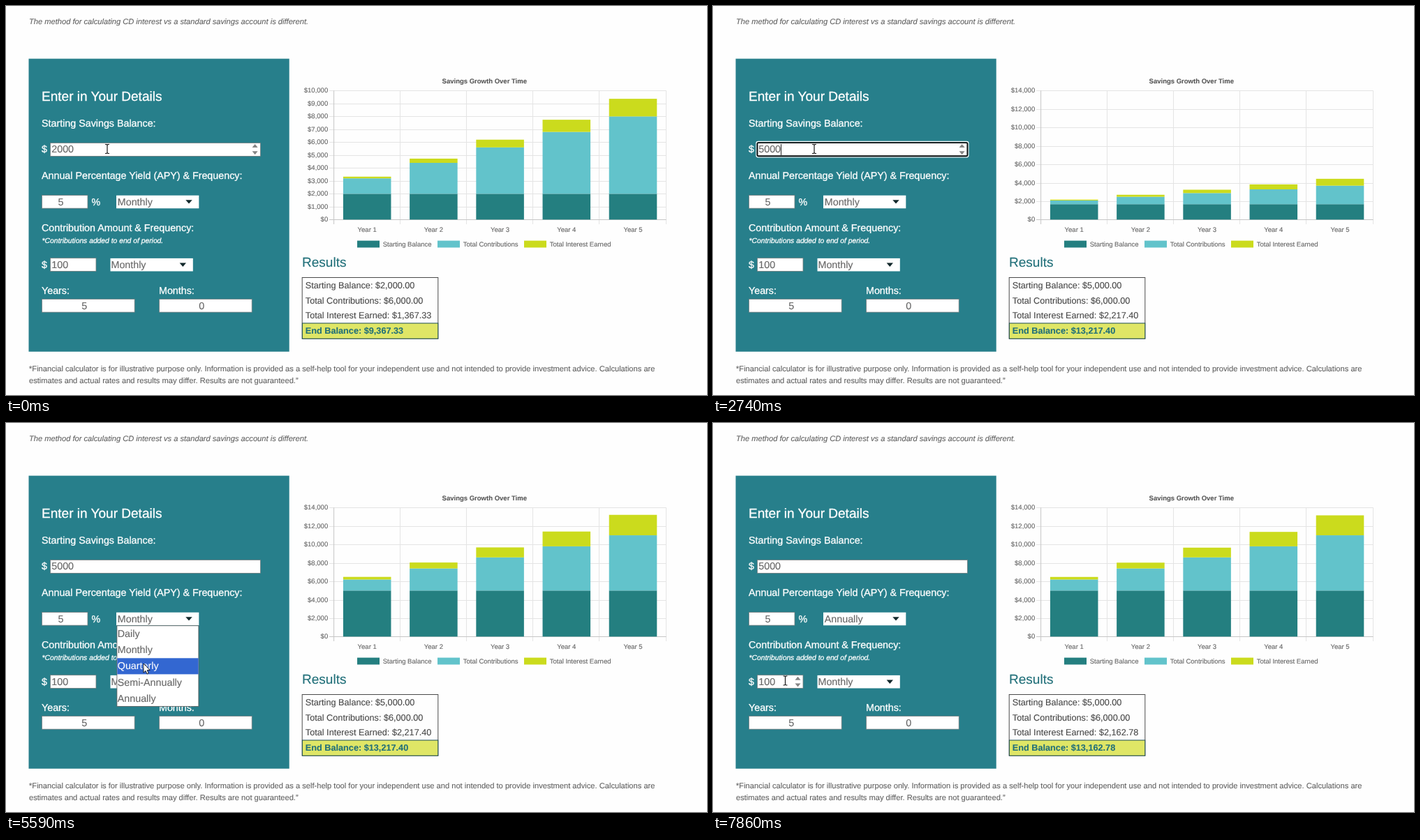
Recreate the animation shown at these times as an HTML page. Size 1004x558 px, loop 8000 ms.

```html
<!DOCTYPE html>
<html lang="en">
<head>
<meta charset="utf-8">
<title>Savings calculator</title>
<style>
html, body { margin: 0; width: 100%; height: 100%; overflow: hidden; background: #fefefe; }
svg { display: block; width: 100vw; height: 100vh; }
text {
  font: 14.29px "Liberation Sans", Arial, sans-serif; white-space: pre; text-rendering: geometricPrecision;
  color: #666; fill: currentColor; stroke: currentColor; stroke-width: .12;
}
.label text { color: #fff; stroke-width: .3; }
.label .head { font-size: 19.05px; }
.label .hint { font-size: 10.32px; font-style: italic; }
.note text { font-size: 11.13px; color: #636363; }
.note .intro { font-style: italic; }
.chart text { font-size: 9.53px; }
.chart .title { font-weight: bold; color: #585858; }
.mid { text-anchor: middle; }
.end { text-anchor: end; }
.field { fill: #fff; stroke: #6f7a7c; stroke-width: .8; }
.select { fill: #fff; }
.tri { fill: #12282b; }
.spin { fill: #858585; }
.rows text { font-size: 12.7px; color: #484848; }
.rows .total { font-weight: bold; color: #22707a; }
.results { font-size: 19.05px; color: #22707a; }
</style>
</head>
<body>
<svg id="stage" viewBox="0 0 1004 558">
  <g class="note">
    <text class="intro" x="33" y="26">The method for calculating CD interest vs a standard savings account is different.</text>
    <text x="33" y="523.7">*Financial calculator is for illustrative purpose only. Information is provided as a self-help tool for your independent use and not intended to provide investment advice. Calculations are</text>
    <text x="33" y="540.5">estimates and actual rates and results may differ. Results are not guaranteed.”</text>
  </g>

  <rect x="32.5" y="75.6" width="373.2" height="420.2" fill="#277f8b"/>
  <g class="label">
    <text class="head" x="51" y="136.3">Enter in Your Details</text>
    <text x="51" y="173">Starting Savings Balance:</text>
    <text x="51" y="210.3">$</text>
    <text x="51" y="248">Annual Percentage Yield (APY) &amp; Frequency:</text>
    <text x="122.5" y="285.5">%</text>
    <text x="51" y="322.8">Contribution Amount &amp; Frequency:</text>
    <text class="hint" x="51.5" y="340.3">*Contributions added to end of period.</text>
    <text x="51" y="375.6">$</text>
    <text x="51" y="412.8">Years:</text>
    <text x="219" y="412.8">Months:</text>
  </g>
  <rect class="field" x="63.4" y="196.4" width="301" height="19"/>
  <rect class="field" x="51.4" y="271.4" width="65.6" height="18.8"/>
  <rect class="field" x="63.4" y="361.7" width="65.6" height="18.8"/>
  <rect class="field" x="51.4" y="420.4" width="132.8" height="18.8"/>
  <rect class="field" x="219.4" y="420.4" width="132.8" height="18.8"/>
  <rect class="select" x="158" y="271.7" width="118.3" height="18.6"/>
  <rect class="select" x="149.5" y="361.9" width="118.3" height="18.6"/>
  <path class="tri" d="M257.3 278.2h9.4l-4.7 5.4zM248.6 368.6h9.4l-4.7 5.4z"/>
  <text class="mid" x="78.5" y="285.5">5</text>
  <text x="65.3" y="375.8">100</text>
  <text x="150.5" y="375.8">Monthly</text>
  <text class="mid" x="112.2" y="434.5">5</text>
  <text class="mid" x="280.2" y="434.5">0</text>
  <text id="frequency" x="159.8" y="285.5"></text>

  <g id="ring" fill="none">
    <rect x="62" y="194.5" width="303.9" height="22.3" rx="2.5" stroke="#fff" stroke-width="1.3"/>
    <rect x="63.5" y="196.1" width="300.9" height="19.2" rx="1.5" stroke="#0b0f10" stroke-width="1.9"/>
  </g>
  <rect id="selection" x="65" y="198" width="32.4" height="16" fill="#4163c9"/>
  <text id="balance" x="65.3" y="210.3"></text>
  <rect id="caret" y="198" width="1" height="16" fill="#222"/>
  <path id="spinBalance" class="spin" d="M352.6 203h8l-4-5zM352.6 208.3h8l-4 5z"/>
  <path id="spinRate" class="spin" d="M105.5 278.7h8l-4-5zM105.5 283.6h8l-4 5z"/>
  <path id="spinAmount" class="spin" d="M117.5 368.7h8l-4-5zM117.5 373.6h8l-4 5z"/>

  <g class="chart">
    <text class="title mid" x="685.3" y="110.7">Savings Growth Over Time</text>
    <path id="grid" fill="none" stroke="#e4e4e4"/>
    <path d="M463 306.5H945.6M469.6 121.3V313" fill="none" stroke="#c6c6c6"/>
    <g id="ticks"></g>
    <g id="bars"></g>
    <g id="legend"></g>
  </g>

  <text class="results" x="424" y="374">Results</text>
  <rect x="424.2" y="389.5" width="194.6" height="87.7" fill="#fefefe" stroke="#4a4a4a"/>
  <rect x="424.4" y="455" width="194.4" height="22.2" fill="#dfe666" stroke="#1c4f55"/>
  <g class="rows" id="rows">
    <text x="428.8" y="405"></text>
    <text x="428.8" y="426.5"></text>
    <text x="428.8" y="448"></text>
    <text class="total" x="428.8" y="470.2"></text>
  </g>

  <g id="menu">
    <rect x="158.9" y="290.8" width="117" height="115.8" fill="#fff" stroke="#555" stroke-width=".8"/>
    <rect id="hover" x="159.3" width="116.3" height="23.1" fill="#3367d1"/>
    <g id="options"></g>
  </g>
  <path id="arrow" d="M0 0V13.2L3 10.4 5 15 7.2 14 5.2 9.6H9.2Z" fill="#fff" stroke="#111" stroke-width=".9"/>
  <path id="beam" d="M-3-6.5h2l1 1 1-1h2M0-5.5V5.5M-3 6.5h2l1-1 1 1h2" fill="none" stroke="#1a1a1a" stroke-width="1.2"/>
</svg>
<script>
const LOOP = 8000;
const $ = id => document.getElementById(id);
const show = (id, on) => { $(id).style.display = on ? '' : 'none'; };

function add(parent, tag, attrs, content = '') {
  const node = document.createElementNS('http://www.w3.org/2000/svg', tag);
  for (const key in attrs) node.setAttribute(key, attrs[key]);
  node.textContent = content;
  return parent.appendChild(node);
}

// Chart geometry
const LEFT = 469.6, RIGHT = 945.6, TOP = 121.4, BASE = 306.4;
const YEARS = 5, SLOT = (RIGHT - LEFT) / YEARS, BAR = SLOT * 0.72;
const SERIES = [
  ['Starting Balance', '#247f80', 503],
  ['Total Contributions', '#62c3cb', 618],
  ['Total Interest Earned', '#cbdb1d', 742]
];
const OPTIONS = ['Daily', 'Monthly', 'Quarterly', 'Semi-Annually', 'Annually'];
const ROW = 23.15, MENU_TOP = 291;

// Moments of the user's actions
const FOCUS = 400, SELECT = 1740, TYPE = 2080, OPEN = 4390, PICK = 6865;

// Each edit redraws the chart from zero: [time, balance, compounding periods per year]
const EDITS = [
  [-2000, 2000, 12], [TYPE, 5, 12], [2280, 50, 12],
  [2470, 500, 12], [2644, 5000, 12], [PICK, 5000, 1]
];

// Pointer path: [time, x, y]
const POINTER = [
  [0, 145, 205], [3330, 145, 205], [3700, 103, 275], [3780, 103, 275], [3790, 101, 275],
  [4020, 101, 275], [4250, 200, 280], [4560, 200, 280], [4780, 198, 308], [4980, 198, 308],
  [4990, 198, 309], [5270, 198, 309], [5590, 197, 345], [6090, 197, 345], [6270, 198, 386],
  [6530, 198, 386], [6540, 184, 387], [6860, 184, 387], [7000, 157.5, 392], [7060, 157.5, 392],
  [7500, 103.5, 369.5], [LOOP, 103.5, 369.5]
];

// Moments at which the text caret starts a fresh blink
const CARET_RESETS = [440, TYPE, 2280, 2470, 2644];

const bars = SERIES.map(([, fill]) =>
  Array.from({ length: YEARS }, (_, i) =>
    add($('bars'), 'rect', { x: LEFT + SLOT * (i + 0.5) - BAR / 2, width: BAR, fill })));
for (let i = 0; i < YEARS; i++) {
  add($('legend'), 'text', { x: LEFT + SLOT * (i + 0.5), y: 323.7, class: 'mid' }, `Year ${i + 1}`);
}
for (const [name, fill, x] of SERIES) {
  add($('legend'), 'rect', { x, y: 336.6, width: 32, height: 9.9, fill });
  add($('legend'), 'text', { x: x + 36.7, y: 344.5 }, name);
}
const options = OPTIONS.map((name, i) =>
  add($('options'), 'text', { x: 159.8, y: MENU_TOP + ROW * (i + 0.5) + 4.6 }, name));

const money = value => '$' + value.toLocaleString('en-US',
  { minimumFractionDigits: 2, maximumFractionDigits: 2 });

function savings(start, periods, years) {
  const rate = (1 + 0.05 / periods) ** (periods / 12) - 1;
  const growth = (1 + rate) ** (12 * years);
  const paid = 1200 * years;
  const total = start * growth + 100 * (growth - 1) / rate;
  return { parts: [start, paid, total - start - paid], total };
}

let current;
function applyEdit(edit) {
  if (edit === current) return;
  current = edit;
  const [, start, periods] = edit;
  const { parts, total } = savings(start, periods, YEARS);
  const step = total > 10000 ? 2000 : 1000;
  edit.max = Math.ceil(total / step) * step;

  let grid = '';
  for (let i = 1; i <= YEARS; i++) grid += `M${Math.round(LEFT + SLOT * i) - 0.5} ${TOP}V313`;
  $('ticks').textContent = '';
  for (let value = 0; value <= edit.max; value += step) {
    const y = BASE - (BASE - TOP) * value / edit.max;
    if (value) grid += `M463 ${Math.round(y) + 0.5}H${RIGHT}`;
    add($('ticks'), 'text', { x: 461.2, y: y + 3, class: 'end' }, '$' + value.toLocaleString('en-US'));
  }
  $('grid').setAttribute('d', grid);

  const lines = SERIES.map(([name], i) => `${name}: ${money(parts[i])}`);
  lines.push(`End Balance: ${money(total)}`);
  lines.forEach((line, i) => { $('rows').children[i].textContent = line; });
  $('balance').textContent = start;
  $('frequency').textContent = periods === 1 ? 'Annually' : 'Monthly';
}

function drawBars([time, start, periods], t, limit) {
  const p = Math.min(1, (t - time) / 1000);
  const scale = (1 - (1 - p) ** 4) * (BASE - TOP) / limit;
  for (let i = 0; i < YEARS; i++) {
    let y = BASE;
    savings(start, periods, i + 1).parts.forEach((value, s) => {
      const height = value * scale;
      y -= height;
      bars[s][i].setAttribute('y', y);
      bars[s][i].setAttribute('height', height);
    });
  }
}

function pointerAt(t) {
  const i = POINTER.findIndex(key => key[0] > t);
  const [t0, x0, y0] = POINTER[i - 1], [t1, x1, y1] = POINTER[i];
  const p = (t - t0) / (t1 - t0), e = p * p * (3 - 2 * p);
  return [x0 + (x1 - x0) * e, y0 + (y1 - y0) * e];
}

function render(t) {
  const edit = EDITS.findLast(e => e[0] <= t);
  applyEdit(edit);
  drawBars(edit, t, edit.max);

  const [x, y] = pointerAt(t);
  const inside = (l, r, top, bottom) => x > l && x < r && y > top && y < bottom;
  const open = t >= OPEN && t < PICK;
  const overBalance = inside(63, 365, 196, 216);
  const overRate = !open && inside(51, 117, 271, 290);
  const overAmount = !open && inside(63, 129, 361, 381);
  const beam = overBalance || overRate || overAmount;
  show('beam', beam);
  show('arrow', !beam);
  $(beam ? 'beam' : 'arrow').setAttribute('transform', `translate(${x} ${y})`);

  const focused = t >= FOCUS && t < OPEN;
  const selected = t >= SELECT && t < TYPE;
  show('ring', focused);
  show('selection', selected);
  $('balance').style.color = selected ? '#fff' : '';
  show('spinBalance', focused || overBalance);
  show('spinRate', overRate);
  show('spinAmount', overAmount);

  const reset = CARET_RESETS.findLast(r => r <= t);
  show('caret', focused && !selected && reset && Math.floor((t - reset) / 535) % 2 === 0);
  $('caret').setAttribute('x', 65.2 + String(edit[1]).length * 7.95);

  show('menu', open);
  if (open) {
    const row = t < 4600 ? 1 : Math.max(0, Math.min(4, Math.floor((y - MENU_TOP) / ROW)));
    $('hover').setAttribute('y', MENU_TOP + ROW * row);
    options.forEach((option, i) => { option.style.color = i === row ? '#fff' : ''; });
  }
}

const began = performance.now();
function tick() {
  render((performance.now() - began) % LOOP);
  requestAnimationFrame(tick);
}
tick();
</script>
</body>
</html>
```
